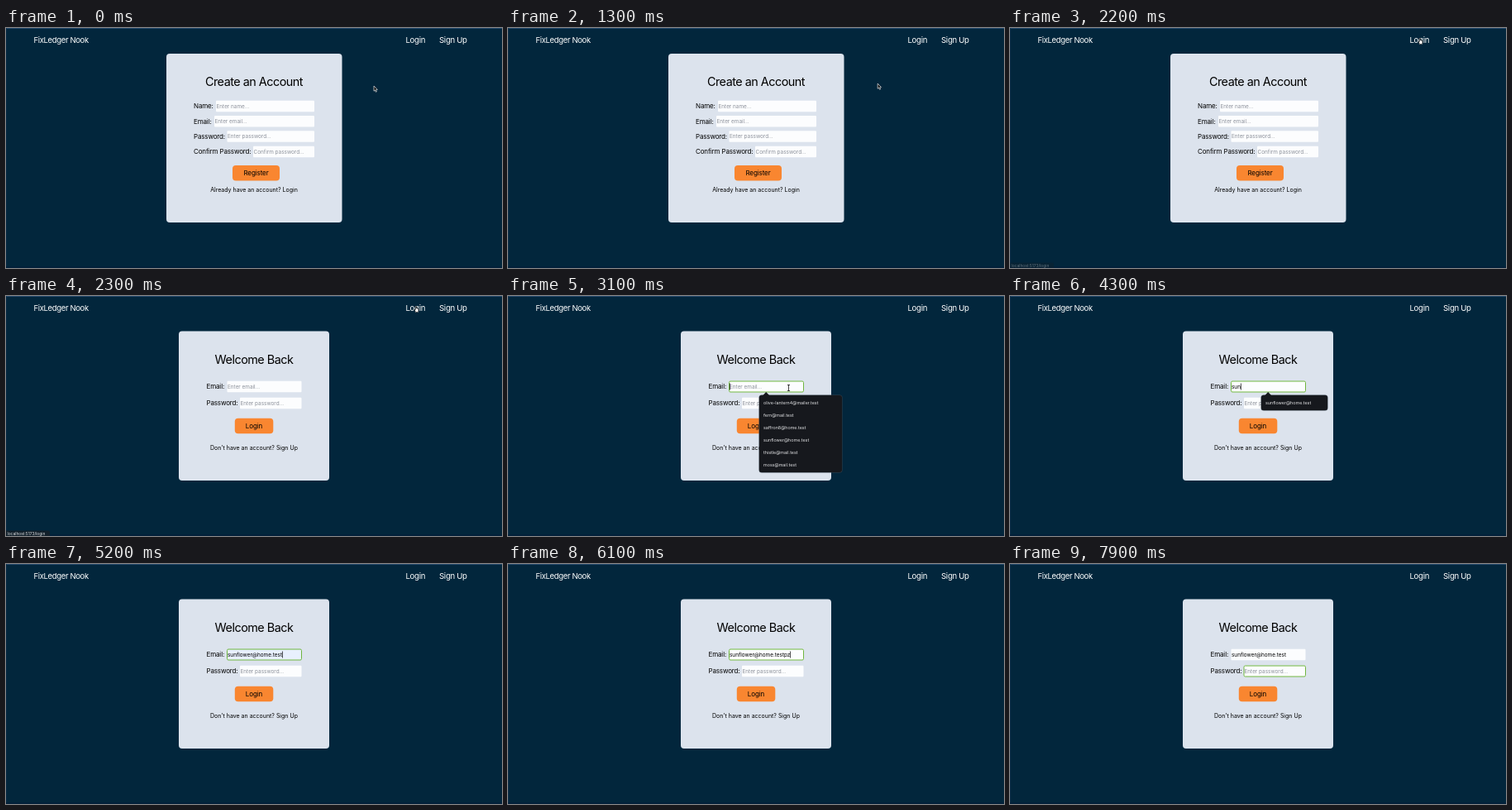
Recreate the animation shown at these times as an HTML page with a canvas. Size 600 px wide and 290 px high, loop 8000 ms.

```html
<!DOCTYPE html>
<html lang="en">
<head>
<meta charset="utf-8">
<title>Login form</title>
<style>
  html, body { margin: 0; width: 100%; height: 100%; overflow: hidden; background: #02263c; }
  canvas { display: block; width: 600px; height: 290px; }
</style>
</head>
<body>
<canvas id="stage"></canvas>
<script>
const canvas = document.getElementById('stage');
const ctx = canvas.getContext('2d');
const ratio = window.devicePixelRatio || 1;
canvas.width = 600 * ratio;
canvas.height = 290 * ratio;

const LOOP = 8000;
const NAVY = '#02263c', CARD = '#dce3ed', ORANGE = '#f98630', GREEN = '#6fb53f';
const EMAIL = 'sunflower@home.test';
const CONTACTS = [
  'olive-lantern4@mailer.test', 'fern@mail.test', 'saffron8@home.test',
  EMAIL, 'thistle@mail.test', 'moss@mail.test'
];

// Email field contents over time
const KEYS = [
  [3100, ''], [3900, 's'], [4100, 'su'], [4300, 'sun'], [4700, EMAIL],
  [5100, EMAIL], [5900, EMAIL + 'p'], [6100, EMAIL + 'pz'],
  [6300, EMAIL + 'p'], [6500, EMAIL]
];

// Pointer path: time, x, y
const PATH = [
  [0, 445, 70], [300, 445, 70], [700, 445.5, 71], [1200, 445, 69.5],
  [2000, 495.5, 12.5], [2400, 495.5, 12.5], [3000, 339.5, 111]
];

function text(str, x, cy, size, color = '#000', spacing = 0, align = 'left') {
  ctx.font = `${size}px Inter, sans-serif`;
  ctx.letterSpacing = spacing + 'px';
  ctx.textAlign = align;
  ctx.fillStyle = color;
  ctx.fillText(str, x, cy + size * 0.36);
}

function box(x, y, w, h, radius, color) {
  ctx.beginPath();
  ctx.roundRect(x, y, w, h, radius);
  ctx.fillStyle = color;
  ctx.fill();
}

function polygon(points, fill, stroke) {
  ctx.beginPath();
  points.forEach(([x, y]) => ctx.lineTo(x, y));
  ctx.closePath();
  ctx.fillStyle = fill;
  ctx.fill();
  if (stroke) {
    ctx.strokeStyle = stroke;
    ctx.lineWidth = 0.7;
    ctx.stroke();
  }
}

const label = (str, x, y) => text(str, x, y, 8, '#000', -0.15);

function field(x, right, cy, hint, { value = '', focus = false, filled = false, caret = false } = {}) {
  box(x, cy - 6.75, right - x, 13.5, 1, filled ? '#e8f0fe' : '#fcfdfe');
  if (focus) {
    ctx.beginPath();
    ctx.roundRect(x, cy - 6.5, right - x, 13, 1.5);
    ctx.strokeStyle = GREEN;
    ctx.lineWidth = 1;
    ctx.stroke();
  }
  text(value || hint, x + 0.5, cy, 6.4, value ? '#000' : '#8d929b');
  if (caret) {
    const end = x + 0.5 + (value ? ctx.measureText(value).width : 0);
    ctx.fillStyle = '#000';
    ctx.fillRect(end, cy - 4, 0.7, 8);
  }
}

function button(str, x, y, w) {
  box(x, y, w, 18.5, 4, ORANGE);
  text(str, x + w / 2, y + 9.4, 8, '#000', -0.1, 'center');
}

function navigation() {
  ctx.fillStyle = NAVY;
  ctx.fillRect(0, 0, 600, 290);
  ctx.fillStyle = '#23476a';
  ctx.fillRect(0, 0, 600, 1);
  ctx.fillStyle = '#0d2f4a';
  ctx.fillRect(0, 0, 0.7, 290);
  ctx.fillStyle = '#02203a';
  ctx.fillRect(0, 288, 600, 2);
  text('FixLedger Nook', 33.5, 14.5, 9.5, '#fff', -0.35);
  text('Login', 483.5, 14.5, 9.6, '#fff', -0.3);
  text('Sign Up', 524, 14.5, 9.6, '#fff', -0.3);
}

function registerPage() {
  box(194, 31, 212.5, 204, 4, CARD);
  text('Create an Account', 300, 65, 14.4, '#000', -0.5, 'center');
  [
    ['Name:', 254, 94.5, 'Enter name...'],
    ['Email:', 252, 112.8, 'Enter email...'],
    ['Password:', 267.5, 131.1, 'Enter password...'],
    ['Confirm Password:', 299, 149.4, 'Confirm password...']
  ].forEach(([name, x, y, hint]) => {
    label(name, 227, y);
    field(x, 373, y, hint);
  });
  button('Register', 274, 166, 57);
  text('Already have an account? Login', 300, 195, 7, '#000', 0, 'center');
}

function suggestions(items, width, selected) {
  const height = 3 + 15 * items.length;
  box(303.5, 119.5, width + 1, height + 1, 3.5, '#35404b');
  polygon([[308, 120.5], [312.2, 116], [316.5, 120.5]], '#16181d');
  box(304, 120, width, height, 3, '#16181d');
  if (selected) box(305, 121.5, width - 2, 15, 2, '#3a3d44');
  items.forEach((item, i) => text(item, 309, 129 + 15 * i, 5.35, '#e3e4e6'));
}

function loginPage(t) {
  const [since, value] = KEYS.findLast(([start]) => t >= start) || [0, ''];
  const onPassword = t >= 7300;
  const onEmail = t >= 3100 && !onPassword;
  const lit = start => (t - start) % 1000 < 500;

  box(209, 42.5, 182, 180.5, 4, CARD);
  text('Welcome Back', 300, 76.5, 14.4, '#000', -0.5, 'center');
  label('Email:', 242.5, 109.5);
  field(267.5, 357.5, 109.5, 'Enter email...', {
    value, focus: onEmail, filled: t >= 5100 && t < 5900, caret: onEmail && lit(since)
  });
  label('Password:', 242.5, 129.5);
  field(283, 357.5, 129.5, 'Enter password...', {
    focus: onPassword, caret: onPassword && lit(7300)
  });
  button('Login', 276.8, 147.7, 46.5);
  text("Don't have an account? Sign Up", 300, 183.5, 7, '#000', 0, 'center');

  if (onEmail && t < 5100) {
    const matches = CONTACTS.filter(item => item.startsWith(value));
    suggestions(matches, matches.length > 2 ? 100 : 80, t >= 4700);
  }
}

function statusBar(t) {
  const alpha = Math.min(1, Math.max(0, (t - 2130) / 170), Math.max(0, (2850 - t) / 200));
  if (!alpha) return;
  ctx.globalAlpha = alpha;
  box(0, 283.5, 53, 7, [0, 2, 0, 0], '#12202b');
  text('localhost:5173/login', 1.5, 287, 4.9, '#e0e2e4');
  ctx.globalAlpha = 1;
}

function pointer(t) {
  if (t >= 3900) return;
  let next = PATH.findIndex(([start]) => start > t);
  if (next < 0) next = PATH.length - 1;
  const [t0, x0, y0] = PATH[next - 1], [t1, x1, y1] = PATH[next];
  const p = Math.min(1, (t - t0) / (t1 - t0));
  const ease = p * p * (3 - 2 * p);
  const x = x0 + (x1 - x0) * ease, y = y0 + (y1 - y0) * ease;

  ctx.save();
  ctx.translate(x, y);
  if (x > 483 && x < 508 && y < 21) {
    polygon([[0, 0], [1, 0], [1.2, 2.4], [3.6, 3], [3.4, 5.6], [2.6, 7], [0.2, 7], [-1.6, 4], [-0.2, 4.2]],
      '#fff', '#1b1b1b');
  } else if (t > 2880) {
    ctx.strokeStyle = '#111';
    ctx.lineWidth = 0.8;
    ctx.beginPath();
    ctx.moveTo(-1.5, -3.5); ctx.lineTo(1.5, -3.5);
    ctx.moveTo(0, -3.5); ctx.lineTo(0, 3.5);
    ctx.moveTo(-1.5, 3.5); ctx.lineTo(1.5, 3.5);
    ctx.stroke();
  } else {
    polygon([[0, 0], [0, 6.2], [1.4, 5], [2.4, 7.3], [3.4, 6.9], [2.5, 4.7], [4.3, 4.5]],
      '#111', '#e8e8e8');
  }
  ctx.restore();
}

function draw(now) {
  const t = now % LOOP;
  ctx.setTransform(ratio, 0, 0, ratio, 0, 0);
  navigation();
  if (t < 2300) registerPage();
  else loginPage(t);
  statusBar(t);
  pointer(t);
}

let began;
function tick(now) {
  began ??= now;
  draw(now - began);
  requestAnimationFrame(tick);
}
requestAnimationFrame(tick);
</script>
</body>
</html>
```
